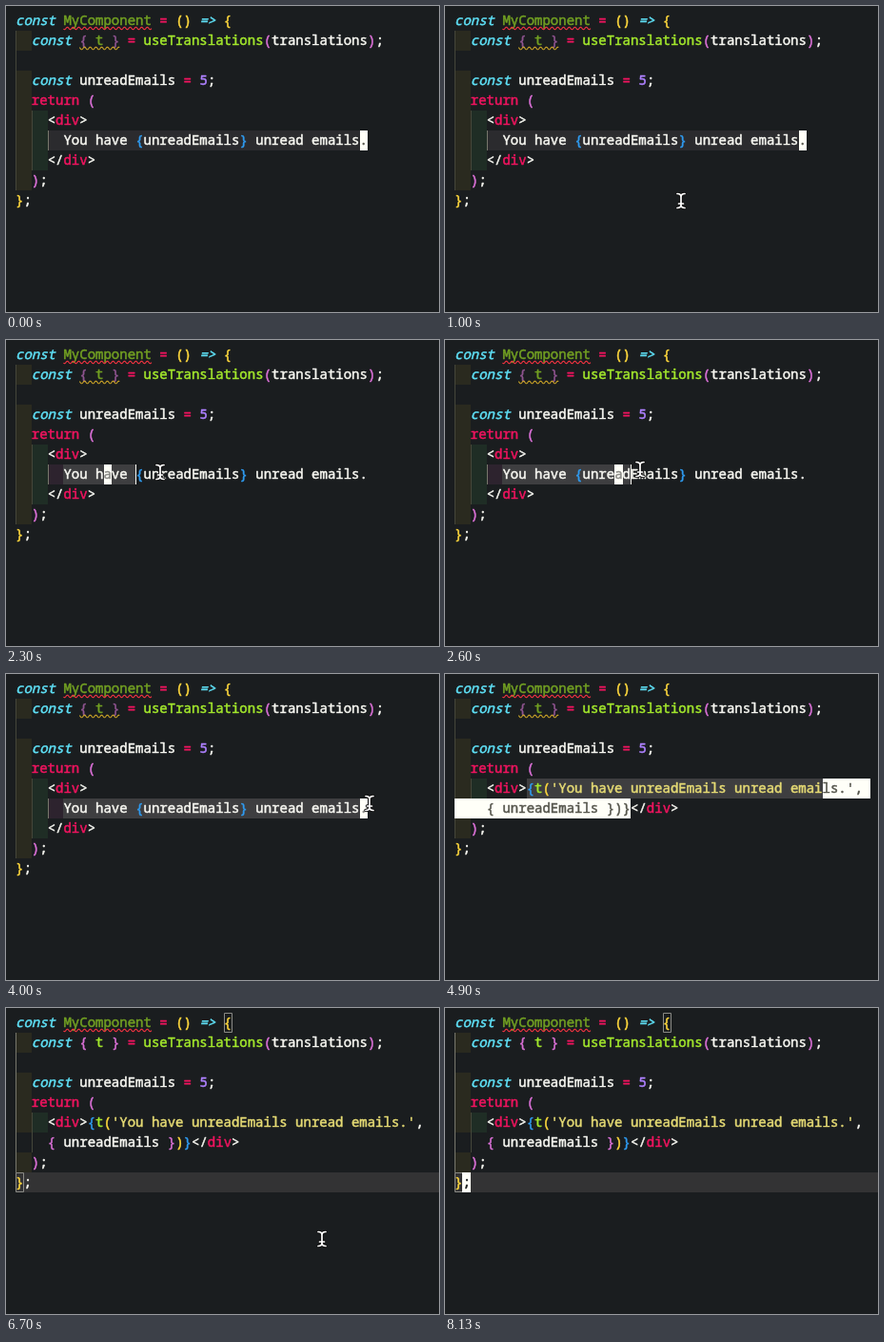
An HTML page with a canvas for the animation above (8.27 s loop, 455 px wide and 322 px high).

```html
<!DOCTYPE html>
<html lang="en">
<head>
<meta charset="utf-8">
<title>Code editor</title>
<style>
  html, body { margin: 0; width: 100%; height: 100%; overflow: hidden; background: #1a1d1f; }
  canvas { display: block; }
</style>
</head>
<body>
<canvas id="stage" width="455" height="322"></canvas>
<script>
const ctx = document.getElementById('stage').getContext('2d');
const LOOP = 8270, LEFT = 10, TOP = 5, CHAR = 8.41, ROW = 21;
const FONT = '500 14px "Noto Sans Mono", "DejaVu Sans Mono", monospace';

const C = {
  bg: '#1a1d1f', white: '#f8f8f2', cyan: '#5fe1f7', pink: '#f0145f', green: '#a3e82c',
  dimGreen: '#72a022', gold: '#ffd83d', orchid: '#da70d6', dimOrchid: '#8f5490',
  blue: '#2f9bf0', purple: '#ae81ff', string: '#e6db74',
  selection: '#3e3e40', faded: '#2b2b2e', line: '#333334', block: '#fffff8', dark: '#55554c',
  olive: '#2a2a1f', leaf: '#1f2d25', plum: '#2d232e', guide: '#45463a', active: '#77776c'
};

const colX = col => LEFT + col * CHAR;
const rowY = row => TOP + row * ROW;

// A line is [start column, text, colour, text, colour, ...].
const head = used => [
  [0, 'const', 'cyan', ' MyComponent', 'dimGreen', ' =', 'pink', ' ()', 'gold', ' =>', 'cyan', ' {', 'gold'],
  [2, 'const', 'cyan', ' {', used ? 'orchid' : 'dimOrchid', ' t', used ? 'green' : 'dimGreen',
    ' }', used ? 'orchid' : 'dimOrchid', ' =', 'pink', ' useTranslations', 'green',
    '(', 'orchid', 'translations', 'white', ')', 'orchid', ';', 'white'],
  [0],
  [2, 'const', 'cyan', ' unreadEmails', 'white', ' =', 'pink', ' 5', 'purple', ';', 'white'],
  [2, 'return', 'pink', ' (', 'orchid']
];
const tail = [
  [2, ')', 'orchid', ';', 'white'],
  [0, '}', 'gold', ';', 'white']
];
const before = [...head(false),
  [4, '<', 'white', 'div', 'pink', '>', 'white'],
  [6, 'You have ', 'white', '{', 'blue', 'unreadEmails', 'white', '}', 'blue', ' unread emails.', 'white'],
  [4, '</', 'white', 'div', 'pink', '>', 'white'],
  ...tail];
const after = used => [...head(used),
  [4, '<', 'white', 'div', 'pink', '>', 'white', '{', 'blue', 't', 'green', '(', 'gold',
    "'You have unreadEmails unread emails.'", 'string', ',', 'white'],
  [4, '{', 'orchid', ' unreadEmails', 'white', ' }', 'orchid', ')', 'gold', '}', 'blue',
    '</', 'white', 'div', 'pink', '>', 'white'],
  ...tail];

// Pointer path: time, x, y. Gaps between the runs hide it.
const pointerRuns = [
  [[100, 404, 304], [400, 330, 246], [800, 254, 206], [1300, 238, 204], [1700, 75, 151], [1800, 63, 144],
    [1900, 61, 142], [2400, 187, 138], [2600, 205, 136], [2700, 214, 136], [3600, 380, 136],
    [3700, 382, 136], [4700, 382, 136]],
  [[5500, 364, 131], [5700, 312, 158], [6000, 244, 187], [6500, 244, 187], [6900, 419, 299], [7000, 419, 299]]
];

function pointerAt(t) {
  const run = pointerRuns.find(r => t >= r[0][0] && t < r[r.length - 1][0]);
  if (!run) return null;
  const i = run.findIndex(p => p[0] > t);
  const [t0, x0, y0] = run[i - 1], [t1, x1, y1] = run[i];
  const k = (t - t0) / (t1 - t0);
  return { x: x0 + (x1 - x0) * k, y: y0 + (y1 - y0) * k };
}

function fillCells(row, from, to, color) {
  ctx.fillStyle = color;
  ctx.fillRect(Math.round(colX(from)), rowY(row), Math.round(colX(to)) - Math.round(colX(from)), ROW);
}

// A hairline stroke gives the glyphs a semi-bold weight.
function drawText(lines, override) {
  ctx.textBaseline = 'alphabetic';
  ctx.lineWidth = 0.5;
  ctx.lineJoin = 'round';
  lines.forEach(([start, ...parts], row) => {
    let col = start;
    for (let i = 0; i < parts.length; i += 2) {
      const text = parts[i], color = parts[i + 1];
      ctx.font = color === 'cyan' ? 'italic ' + FONT : FONT;
      ctx.fillStyle = ctx.strokeStyle = override || C[color];
      ctx.fillText(text, colX(col), rowY(row) + 15);
      ctx.strokeText(text, colX(col), rowY(row) + 15);
      col += text.length;
    }
  });
}

function drawBlock(lines, row, from, to, ink) {
  fillCells(row, from, to, C.block);
  ctx.save();
  ctx.beginPath();
  ctx.rect(colX(from), rowY(row), colX(to) - colX(from), ROW);
  ctx.clip();
  drawText(lines, ink);
  ctx.restore();
}

function squiggle(row, from, to, color) {
  const y = rowY(row) + 18.5;
  ctx.beginPath();
  for (let x = colX(from); x <= colX(to); x += 0.5) ctx.lineTo(x, y + 1.3 * Math.sin(x * Math.PI / 3));
  ctx.strokeStyle = color;
  ctx.lineWidth = 1.1;
  ctx.stroke();
}

function bracketBox(row, col) {
  ctx.strokeStyle = '#8b8b86';
  ctx.lineWidth = 1;
  ctx.strokeRect(Math.round(colX(col)) + 0.5, rowY(row) + 0.5, 8, ROW - 1);
}

function guideLine(col, from, to, color) {
  ctx.fillStyle = color;
  ctx.fillRect(Math.round(colX(col)), rowY(from), 1, (to - from) * ROW);
}

function drawPointer({ x, y }) {
  ctx.save();
  ctx.translate(Math.round(x), Math.round(y));
  ctx.beginPath();
  for (const s of [-1, 1]) {
    ctx.moveTo(-4, 7.5 * s);
    ctx.quadraticCurveTo(0, 7.5 * s, 0, 4 * s);
    ctx.quadraticCurveTo(0, 7.5 * s, 4, 7.5 * s);
  }
  ctx.moveTo(0, -5);
  ctx.lineTo(0, 5);
  ctx.moveTo(-2.5, 3);
  ctx.lineTo(2.5, 3);
  ctx.lineCap = 'round';
  for (const [color, width] of [['#111', 3.6], ['#fff', 1.7]]) {
    ctx.strokeStyle = color;
    ctx.lineWidth = width;
    ctx.stroke();
  }
  ctx.restore();
}

// Mouse selection: the caret trails the pointer, the block trails the caret.
function dragState(t) {
  const colAt = time => {
    const p = pointerAt(Math.min(Math.max(time, 1900), 4600));
    return Math.min(44, Math.max(6, Math.round((p.x - LEFT) / CHAR)));
  };
  return { end: colAt(t - 100), block: Math.max(6, colAt(t - 200) - 1) };
}

function draw(t) {
  const step = Math.floor(t / 100) * 100;
  const replaced = t >= 4700, used = t >= 5300;
  const lines = replaced ? after(used) : before;
  const last = lines.length - 1;
  const atEnd = (t >= 1300 && t < 1900) || t >= 6200;
  const dragging = t >= 1900 && !replaced;
  const selectedResult = replaced && !atEnd;
  const drag = dragging ? dragState(step) : null;

  ctx.fillStyle = C.bg;
  ctx.fillRect(0, 0, 455, 322);

  if (atEnd) {
    ctx.fillStyle = C.line;
    ctx.fillRect(LEFT, rowY(last), 455 - LEFT, ROW);
  }

  // Indent tints skip the blank line and the wrapped one.
  for (let row = 1; row < last; row++) {
    if (row !== 2 && !(replaced && row === 6)) fillCells(row, 0, 2, C.olive);
  }
  for (let row = 5; row < (replaced ? 6 : 8); row++) fillCells(row, 2, 4, C.leaf);
  if (!replaced) fillCells(6, 4, 6, C.plum);

  if (t < 1300) fillCells(6, 4, 43, C.faded);
  if (dragging) fillCells(6, 6, drag.end, C.selection);
  if (selectedResult) fillCells(5, 9, 46, C.selection);

  guideLine(0, 1, last, atEnd ? C.active : C.guide);
  guideLine(2, 5, replaced ? 7 : 8, C.guide);
  if (!replaced && !atEnd) guideLine(4, 6, 7, C.active);

  drawText(lines);
  squiggle(0, 6, 17, '#ef3340');
  if (!used) squiggle(1, 8, 13, '#c9a227');

  if (atEnd) {
    bracketBox(0, 26);
    bracketBox(last, 0);
    const off = (t >= 6600 && t < 7100) || (t >= 7600 && t < 8130);
    if (!off) drawBlock(lines, last, 1, 2, C.bg);
  } else if (selectedResult) {
    drawBlock(lines, 5, 46, 52, C.dark);
    drawBlock(lines, 6, 0, 22, C.dark);
  } else if (dragging) {
    drawBlock(lines, 6, drag.block, drag.block + 1, '#8a8a86');
    if (t < 4000 || t >= 4500) guideLine(drag.end, 6, 7, C.white);
  } else {
    drawBlock(lines, 6, 43, 44, C.dark);
  }

  const pointer = pointerAt(step);
  if (pointer) drawPointer(pointer);
}

const begin = performance.now();
function tick() {
  draw((performance.now() - begin) % LOOP);
  requestAnimationFrame(tick);
}
tick();
</script>
</body>
</html>
```
